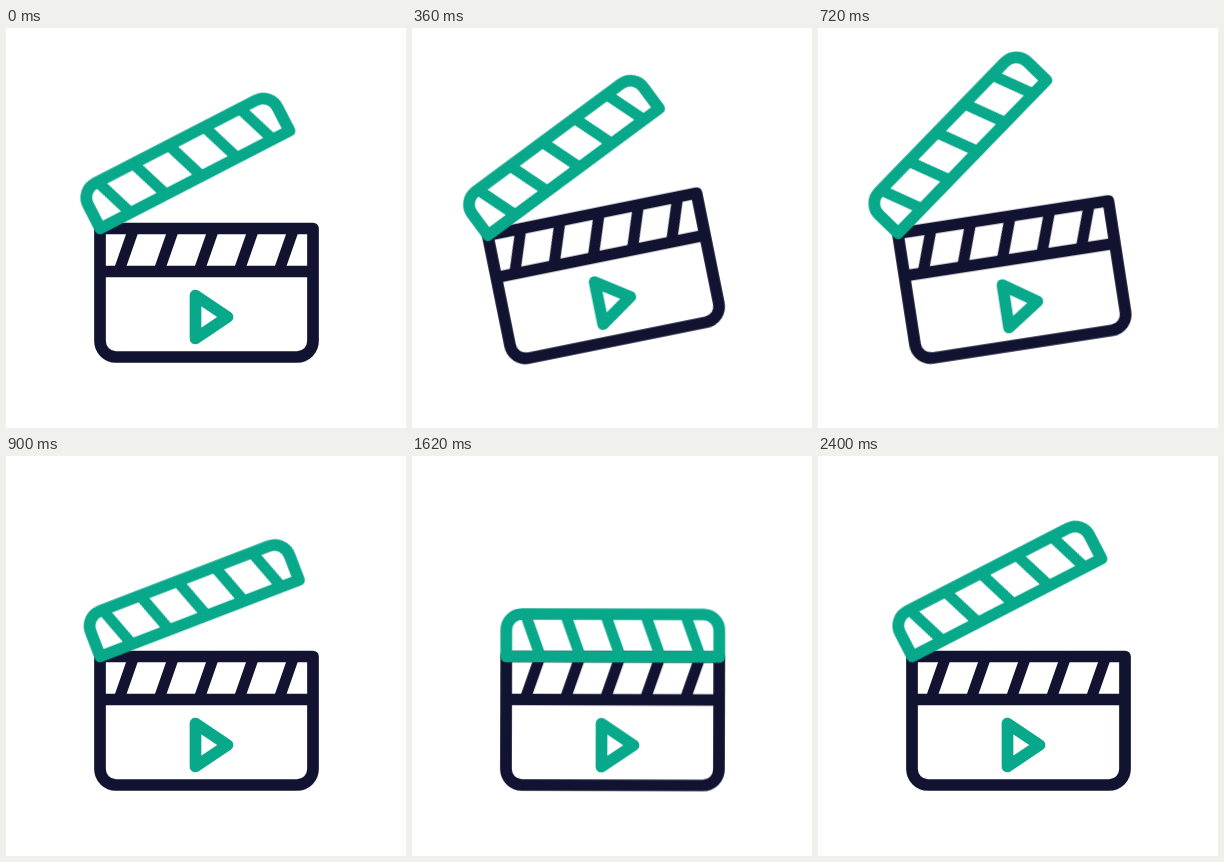
Recreate the animation shown at these times as an HTML page without scripts. Size 400 by 400 pixels, loop 2.46 s.

```html
<!DOCTYPE html>
<html lang="en">
<head>
<meta charset="utf-8">
<title>Clapperboard</title>
<style>
  html, body { margin: 0; width: 100%; height: 100%; overflow: hidden; background: #fff; }
  svg { display: block; width: 100%; height: 100%; }
  path { fill: none; stroke-width: 11.7; stroke-linejoin: round; }
  .stripes { stroke-width: 11; }
  .navy { stroke: #121331; }
  .green { stroke: #08a88a; }

  .board, .arm {
    animation: 2460ms cubic-bezier(.37, 0, .63, 1) infinite;
  }
  .board { transform-origin: 119px 295px; animation-name: swing; }
  .arm { transform-origin: 94px 200px; animation-name: clap; }

  @keyframes swing {
    0% { transform: rotate(0deg); }
    7.32% { transform: rotate(5.5deg); }
    17.07%, 24.39% { transform: rotate(-14.2deg); }
    35.98%, 65.04% { transform: rotate(0deg); }
    72.76% { transform: rotate(5.5deg); }
    84.96%, 100% { transform: rotate(0deg); }
  }

  /* The arm slams shut, rebounds slightly, then reopens past its rest angle. */
  @keyframes clap {
    0% { transform: rotate(-27.3deg); }
    11.79% { transform: rotate(-23deg); }
    24.39% { transform: rotate(-40deg); animation-timing-function: cubic-bezier(.5, 0, .75, .8); }
    43.9% { transform: rotate(0deg); }
    48.78% { transform: rotate(-2deg); }
    53.66%, 77.85% { transform: rotate(0deg); }
    84.45% { transform: rotate(-36.3deg); }
    97.56%, 100% { transform: rotate(-27.3deg); }
  }
</style>
</head>
<body>
<svg viewBox="0 0 400 400">
  <g class="board">
    <g class="navy">
      <path d="M94 200.5H307V313a16 16 0 0 1-16 16H110a16 16 0 0 1-16-16Z"/>
      <path d="M94 243.5H307"/>
      <path class="stripes" d="M128 200l-15 43m55-43l-15 43m55-43l-15 43m55-43l-15 43m55-43l-15 43"/>
    </g>
    <path class="green" d="M189.5 267.5V310.5L221.5 289Z"/>
    <g class="arm green">
      <path d="M94 200.5V174a16 16 0 0 1 16-16H291a16 16 0 0 1 16 16V200.5Z"/>
      <path class="stripes" d="M128 200l-15-42m55 42l-15-42m55 42l-15-42m55 42l-15-42m55 42l-15-42"/>
    </g>
  </g>
</svg>
</body>
</html>
```
